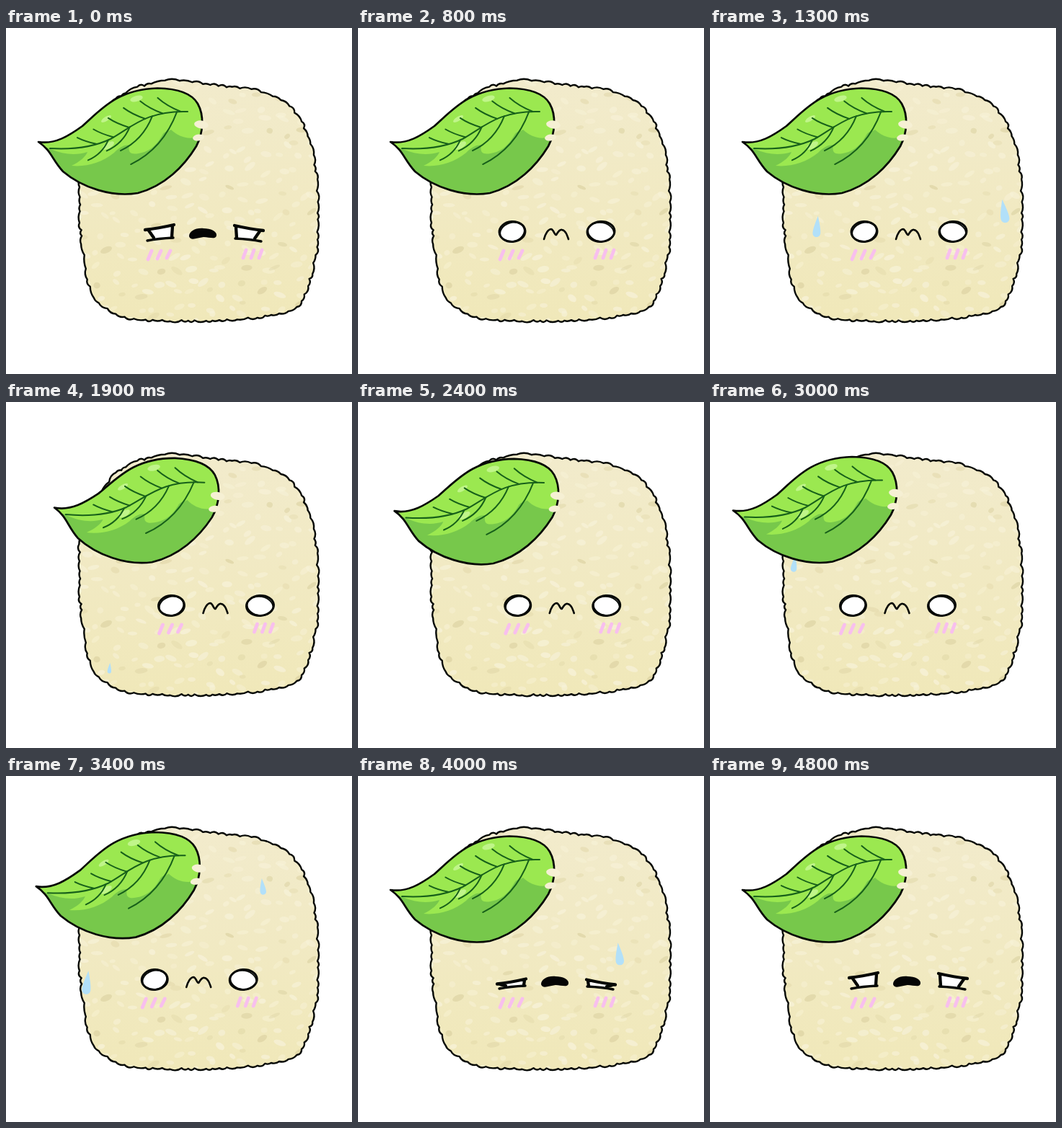
Write an HTML page that moves like this. It is 480 by 480 pixels and loops after 5300 ms.

```html
<!DOCTYPE html>
<html lang="en">
<head>
<meta charset="utf-8">
<title>Worried rice cake</title>
<style>
  html, body { margin: 0; width: 100%; height: 100%; overflow: hidden; background: #fff; }
  svg { display: block; width: 100vw; height: 100vh; }
  .ink { fill: none; stroke: #050805; stroke-linecap: round; stroke-linejoin: round; }
  .vein { fill: none; stroke: #17601a; stroke-width: 2; stroke-linecap: round; }
</style>
</head>
<body>
<svg viewBox="0 0 480 480">
  <defs>
    <linearGradient id="rice" x1="0" y1="0" x2="0" y2="1">
      <stop offset="0" stop-color="#f2ebcc"/>
      <stop offset="1" stop-color="#f0e8b9"/>
    </linearGradient>
    <path id="bodyShape"/>
    <path id="leafShape" d="M45 158 C68 162 88 149 106 136 C131 114 154 85 210 83.5 C240 84 258 91 266 105
      C275 121 274 145 264 164 C247 192 220 219 183 229 C148 235 106 222 79 199 C64 183 63 170 45 158Z"/>
    <clipPath id="bodyClip"><use href="#bodyShape"/></clipPath>
    <clipPath id="leafClip"><use href="#leafShape"/></clipPath>
  </defs>

  <use href="#bodyShape" fill="url(#rice)"/>
  <g id="grains" clip-path="url(#bodyClip)"></g>
  <use href="#bodyShape" class="ink" stroke-width="2.4"/>
  <g id="drops" fill="#b2e0f9"></g>

  <g id="leaf">
    <g clip-path="url(#leafClip)">
      <rect x="40" y="75" width="240" height="165" fill="#77c84b"/>
      <path fill="#9be850" d="M40 159 L90 70 L285 70 L272 148 C258 157 240 152 229 141
        C223 145 220 142 216 150 C207 166 196 172 184 174 C173 176 169 173 171 163
        C165 161 157 166 150 173 C133 187 111 193 91 191 C102 186 111 178 113 172 C98 177 80 176 62 168Z"/>
      <g id="shine" fill="#c0f58a"></g>
    </g>
    <path id="midrib" class="vein" d="M61 167 C95 169 124 164 145 154 C174 138 195 114 252 116"/>
    <path id="veins" class="vein"/>
    <use href="#leafShape" class="ink" stroke-width="2.7"/>
    <g id="rimGrains" fill="#f6f0d4"></g>
  </g>

  <g id="face">
    <path id="blush" fill="none" stroke="#f8bfee" stroke-width="4.8" stroke-linecap="round"/>
    <g id="shock">
      <g id="roundEyes" class="ink"></g>
      <path class="ink" stroke-width="2.6" d="M258 293 C260 285 264 279 268 279 C272 280 272 287 275 287
        C277 284 279 279 283 280 C288 281 290 287 292 293"/>
    </g>
    <g id="tired">
      <g id="leftEye"></g>
      <g id="rightEye" transform="translate(550 1) scale(-1 1)"></g>
      <path fill="#050505" d="M254 289 C254 282 263 277 274 278 C284 278 293 282 292 288
        C291 294 282 290 274 290 C265 291 256 296 254 289Z"/>
    </g>
  </g>
</svg>

<script>
const $ = id => document.getElementById(id);
const LOOP = 5300, STEP = 100;
const clamp = v => Math.max(0, Math.min(1, v));

let seed = 41;
function rand(min, max) {
  seed = (seed * 16807) % 2147483647;
  return min + (max - min) * seed / 2147483647;
}

function oval(x, y, rx, ry, turn, extra = "") {
  return `<ellipse cx="${x}" cy="${y}" rx="${rx}" ry="${ry}" transform="rotate(${turn} ${x} ${y})" ${extra}/>`;
}

// Closed smooth curve through a few points.
function smoothPath(p) {
  const pt = i => p[(i + p.length) % p.length];
  let d = `M${p[0]}`;
  p.forEach((a, i) => {
    const z = pt(i - 1), b = pt(i + 1), c = pt(i + 2);
    const c1 = [0, 1].map(k => a[k] + (b[k] - z[k]) / 6);
    const c2 = [0, 1].map(k => b[k] - (c[k] - a[k]) / 6);
    d += `C${c1} ${c2} ${b}`;
  });
  return d + "Z";
}

// Walks along a curve in uneven strides and swells each one outward.
function bumpyPath(d) {
  const curve = document.createElementNS("http://www.w3.org/2000/svg", "path");
  curve.setAttribute("d", d);
  const total = curve.getTotalLength(), corners = [];
  for (let s = 0; s < total - 8; s += rand(8, 18)) {
    const { x, y } = curve.getPointAtLength(s);
    corners.push([x + rand(-1.3, 1.3), y + rand(-1.3, 1.3)]);
  }
  let out = `M${corners[0]}`;
  corners.forEach(([x, y], i) => {
    const [nx, ny] = corners[(i + 1) % corners.length];
    const k = rand(2, 5) / Math.hypot(nx - x, ny - y);
    out += `Q${(x + nx) / 2 + (ny - y) * k} ${(y + ny) / 2 - (nx - x) * k} ${nx} ${ny}`;
  });
  return out + "Z";
}

function grains() {
  let out = "";
  for (let y = 80; y < 405; y += 17) {
    for (let x = 106; x < 436; x += 25) {
      const dark = rand(0, 1) < 0.2;
      out += oval(x + rand(-10, 10), y + rand(-7, 7), rand(4, 9), rand(2.4, 4.4), rand(-40, 40),
        `fill="${dark ? "#ddd3a3" : "#f8f3da"}" opacity="${rand(0.3, 0.75)}"`);
    }
  }
  return out;
}

function sideVeins() {
  const rib = $("midrib"), length = rib.getTotalLength();
  const branch = (baseX, dx, dy, bend) => {
    const { x, y } = rib.getPointAtLength(length * (baseX - 61) / 191);
    return `M${x} ${y}q${dx * bend} ${dy * (1 - bend)} ${dx} ${dy}`;
  };
  let d = "";
  for (let i = 0; i < 6; i++) d += branch(123 + 24 * i, -27 - i, -9 - 2 * i, 0.6);
  for (let i = 0; i < 4; i++) d += branch(139 + 33 * i, -28 - 4 * i * i, 28 + 5 * i * i, 0.3);
  return d;
}

$("bodyShape").setAttribute("d", bumpyPath(smoothPath([
  [222, 73], [290, 80], [355, 90], [402, 119], [425, 172], [433, 240], [430, 310], [416, 364],
  [388, 394], [290, 405], [180, 403], [126, 378], [109, 325], [102, 245], [107, 180], [152, 100]
])));
$("grains").innerHTML = grains();
$("veins").setAttribute("d", sideVeins());
$("shine").innerHTML = oval(181, 98, 9, 4, -15) + oval(142, 163, 9, 4, -30) + oval(139, 126, 8, 3, -32);
$("rimGrains").innerHTML = oval(271, 134, 10, 5.5, 8) + oval(267, 152, 8, 4.5, -8);

let slashes = "";
for (let i = 0; i < 3; i++) {
  slashes += `M${202 + 13 * i} 309l-5 ${12 - i}M${333 + 11 * i} 308l-4 11`;
}
$("blush").setAttribute("d", slashes);

// Each round eye is a solid ring plus a looser pen stroke.
$("roundEyes").innerHTML = [214, 337].map((x, i) =>
  oval(x, 282.5, 18 + i, 14, -4, 'fill="#fff" stroke-width="3"') +
  oval(x, 283, 17 + i, 13, 27 * i - 17, 'stroke-width="1.7"')
).join("");

// open: 0 is a slit, 1 is half open
function tiredEye(open) {
  const drop = (1 - open) * 8.5;
  const outer = 280 + drop, inner = 273 + drop;
  return `<path fill="#fff" d="M201 ${outer} L230 ${inner + 3} L229 290 L206 292Z"/>
    <path class="ink" stroke-width="4.3" d="M193 ${outer} Q211 ${outer - 2} 233 ${inner}
      M198 ${outer + 1} L205 291 M231 ${inner + 2} L230 290"/>
    <path class="ink" stroke-width="3.4" d="M196 295 Q211 292 232 291"/>`;
}

const drops = [
  { from: 900, x: 402, y: 192 }, { from: 1000, x: 151, y: 229 },
  { from: 2900, x: 118, y: 209 }, { from: 3300, x: 355, y: 138 }
];

function drawDrop({ from, x, y }, t) {
  const n = (t - from) / STEP;
  if (n < 0 || n >= 10) return "";
  const drift = (x - 240) / 110;
  const size = 1.2 * Math.min(1, 0.6 + n * 0.1, 0.2 + (10 - n) * 0.25);
  return `<path transform="translate(${x + drift * n} ${y + 15.6 * n}) rotate(${-6 * drift}) scale(${size})"
    d="M0 -14 C2 -7 5 2 5 8 C5 15 -5 15 -5 8 C-5 2 -2 -7 0 -14Z"/>`;
}

// Rises to 1 in two steps, holds, and falls back the same way.
const hold = (t, from, to) => clamp(Math.min(t - from + STEP, to + STEP - t) / (2 * STEP));

function render(t) {
  const lean = hold(t, 1600, 2400) - hold(t, 2600, 3400);
  const leafX = 17.5 * lean * Math.abs(lean) + 4.5 * lean * lean;
  const leafY = -7.5 * Math.sqrt(Math.abs(lean));
  $("face").setAttribute("transform", `translate(${15.5 * lean} 0)`);
  $("leaf").setAttribute("transform", `translate(${leafX} ${leafY}) rotate(${lean + lean * lean} 160 157)`);

  const scared = t >= 800 && t < 3600;
  $("shock").style.display = scared ? "" : "none";
  $("tired").style.display = scared ? "none" : "";
  const open = Math.max(clamp(1 - t / 300), clamp((t - 4400) / 400));
  $("leftEye").innerHTML = $("rightEye").innerHTML = tiredEye(open);
  $("drops").innerHTML = drops.map(d => drawDrop(d, t)).join("");
}

const start = performance.now();
let shown = -1;
function tick() {
  const t = Math.floor((performance.now() - start) % LOOP / STEP) * STEP;
  if (t !== shown) render(shown = t);
  requestAnimationFrame(tick);
}
tick();
</script>
</body>
</html>
```
